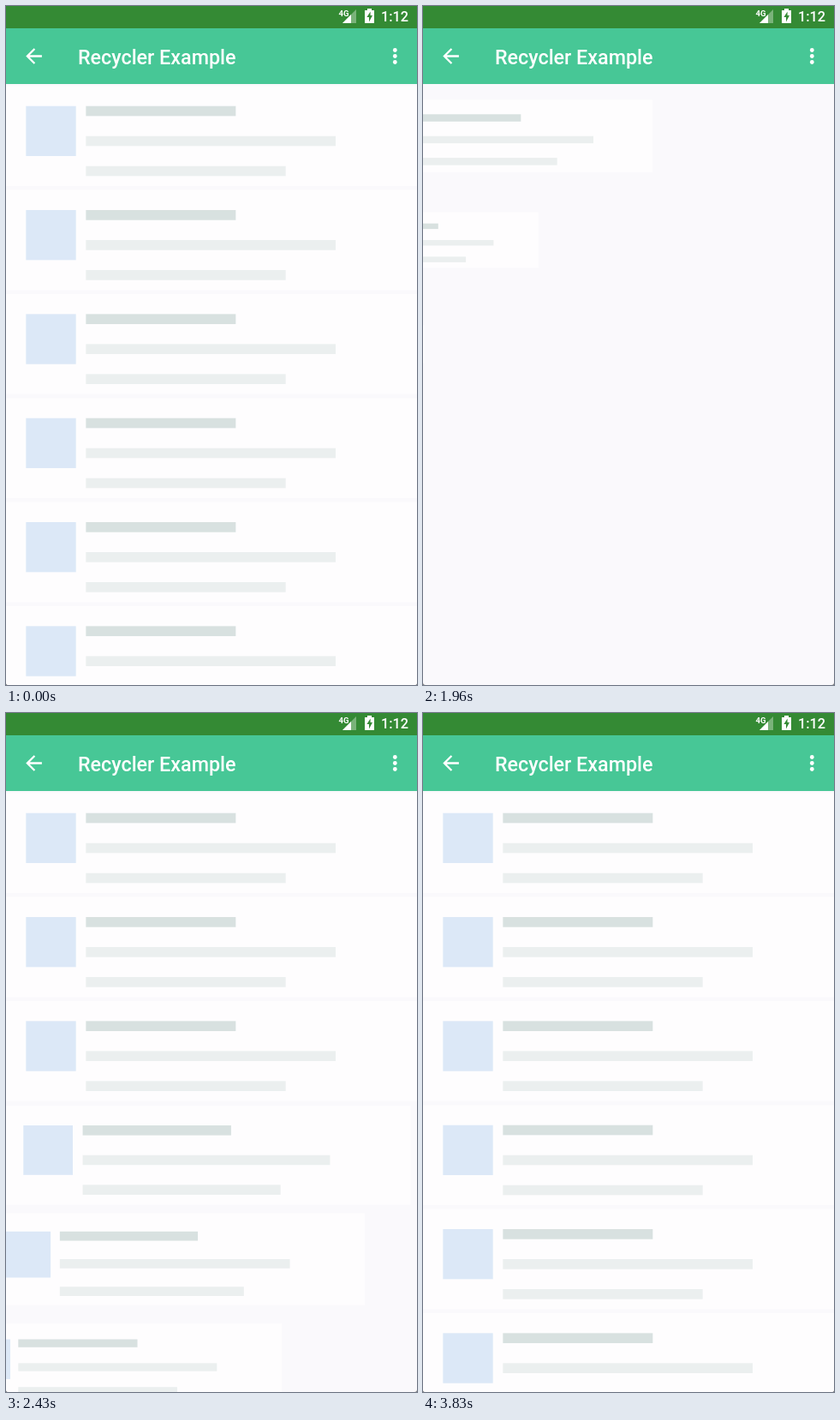
An HTML page for the animation above (3.88 s loop, 480 by 792 pixels).

```html
<!DOCTYPE html>
<html lang="en">
<head>
<meta charset="utf-8">
<title>Recycler Example</title>
<style>
  html, body { margin: 0; width: 100%; height: 100%; overflow: hidden; background: #777; }
  svg { display: block; width: 480px; height: 792px; background: #faf9fc; border-radius: 0 0 3px 3px; }
  text { font-family: Roboto, sans-serif; font-weight: 500; fill: #fff; }
</style>
</head>
<body>
<svg viewBox="0 0 480 792">
  <defs>
    <!-- One list row, in dp -->
    <g id="row" transform="scale(1.45833)">
      <rect width="329.143" height="80" fill="#fefdfe"/>
      <rect x="16" y="16" width="40" height="40" fill="#dce8f7"/>
      <rect x="64" y="16" width="120" height="8" fill="#d8e1e0"/>
      <rect x="64" y="40" width="200" height="8" fill="#ebefef"/>
      <rect x="64" y="64" width="160" height="8" fill="#ebefef"/>
    </g>
  </defs>
  <g id="list"></g>

  <rect width="480" height="26" fill="#348a34"/>
  <rect y="26" width="480" height="65" fill="#47c796"/>

  <text x="388.5" y="11.5" font-size="9.5" style="font-weight:700">4G</text>
  <g fill="#fff">
    <path d="M409 4V20H393Z" opacity=".35"/>
    <path d="M403 10V20H393Z"/>
    <path d="M422 5V3h5v2h3v15h-11V5Z"/>
    <path d="M425.6 6.5V11h2.4l-4 7.5V13h-2.6Z" fill="#348a34"/>
    <path transform="translate(18.6 44.5) scale(1.165)"
      d="M20 11H7.83l5.59-5.59L12 4l-8 8 8 8 1.41-1.41L7.83 13H20v-2z"/>
    <circle cx="454.3" cy="51.5" r="2.4"/>
    <circle cx="454.3" cy="58.5" r="2.4"/>
    <circle cx="454.3" cy="65.5" r="2.4"/>
  </g>
  <text x="438" y="18.3" font-size="16.3">1:12</text>
  <text x="84" y="67.5" font-size="23.3">Recycler Example</text>
</svg>
<script>
  const LOOP = 3880, START = 1384, STAGGER = 100, DURATION = 800;
  const WIDTH = 480, ROW_HEIGHT = 116.667, PITCH = 121.333, FIRST_CENTER = 151.7;
  const clamp = (v, lo, hi) => Math.min(hi, Math.max(lo, v));

  const list = document.getElementById('list');
  const rows = Array.from({ length: 6 }, () => {
    const row = document.createElementNS('http://www.w3.org/2000/svg', 'use');
    row.setAttribute('href', '#row');
    return list.appendChild(row);
  });

  // The entrance stalls briefly, then catches up.
  const lag = t => Math.min(clamp(t - 1650, 0, 75), 75 * clamp((2300 - t) / 340, 0, 1));

  function draw(t) {
    const clock = t - lag(t) - START;
    rows.forEach((row, i) => {
      const u = (clock - i * STAGGER) / DURATION;
      // A row rests in place until its turn, then restarts from the left.
      const p = u < 0 || u > 1 ? 1 : (1 - Math.cos(Math.PI * u)) / 2;
      const x = WIDTH / 2 - WIDTH * (1 - p), y = FIRST_CENTER + i * PITCH;
      row.setAttribute('transform',
        `translate(${x} ${y}) scale(${0.1 + 0.9 * p}) translate(${-WIDTH / 2} ${-ROW_HEIGHT / 2})`);
    });
  }

  const begin = performance.now();
  function tick() {
    draw((performance.now() - begin) % LOOP);
    requestAnimationFrame(tick);
  }
  tick();
</script>
</body>
</html>
```
